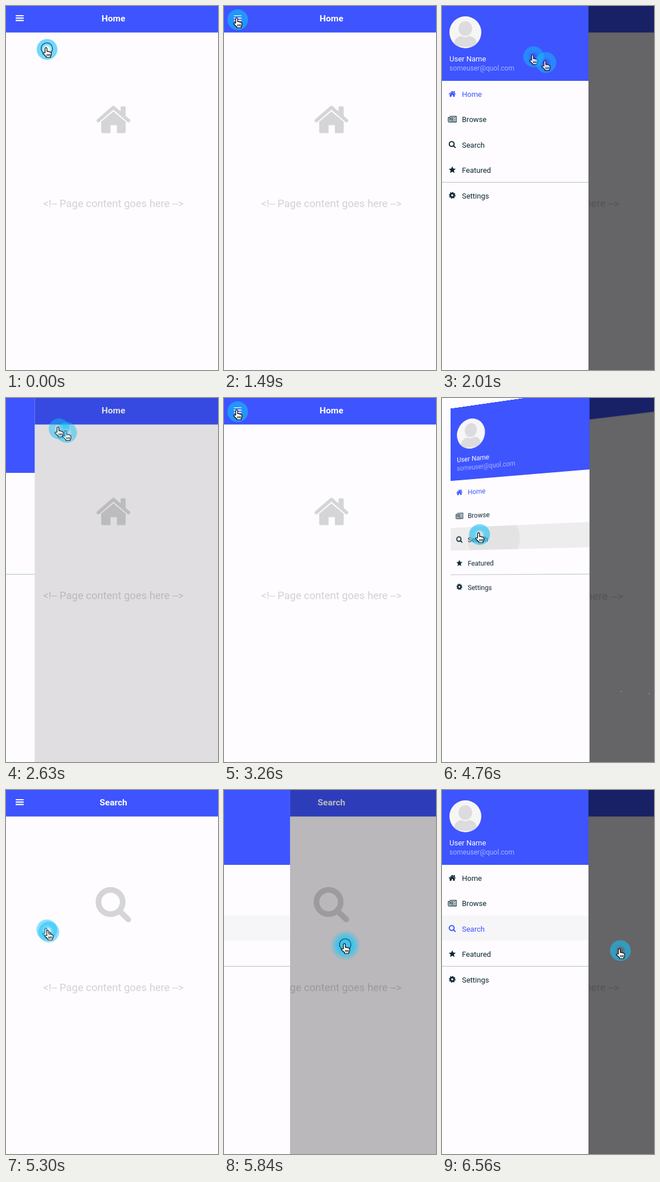
These frames come from a looping animation (372x637 px, 6830 ms). An HTML page:

```html
<!DOCTYPE html>
<html lang="en">
<head>
<meta charset="utf-8">
<title>Side menu</title>
<style>
  html, body { margin: 0; width: 100%; height: 100%; overflow: hidden; background: #fefcff; }
  svg { position: absolute; left: 0; top: 0; width: 372px; height: 637px; overflow: visible; }
  #scene { transform-origin: 186px 318.5px; }
  text { font-family: Roboto, "Open Sans", sans-serif; }
</style>
</head>
<body>
<svg id="scene" viewBox="0 0 372 637">
  <defs>
    <g id="home">
      <path d="M-26.5 2 0-21 26.5 2" fill="none" stroke="currentColor" stroke-width="6" stroke-linecap="round" stroke-linejoin="round"/>
      <path fill="currentColor" d="M12.5-21q0-2 2-2h5q2 0 2 2V-3l-9-8Z"/>
      <path fill="currentColor" d="M-21.5 4 0-14 21.5 4V21.5q0 2.5-2.5 2.5H6V10H-5V24H-19q-2.5 0-2.5-2.5Z"/>
    </g>
    <g id="search" fill="none" stroke="currentColor" stroke-width="10" stroke-linecap="round">
      <circle cx="-5" cy="-5" r="21.3"/>
      <path d="M11 11 26 25.5"/>
    </g>
    <g id="browse" fill="none" stroke="currentColor" stroke-width="1.2">
      <path d="M-4.5-5H7V5H-5.5Q-7 5-7 3.5V-3H-4.5V3.5"/>
      <path d="M-2.5-2.5H1V.8H-2.5ZM2.5-2.6H5.5M2.5 .4H5.5M-2.8 2.9H5.5"/>
    </g>
    <path id="star" fill="currentColor"/>
    <g id="gear" fill="none" stroke="currentColor">
      <circle r="3.3" stroke-width="2.9"/>
      <circle r="5" stroke-width="1.8" pathLength="16" stroke-dasharray="1 1"/>
    </g>
  </defs>
  <g id="page">
    <rect y="-6" width="372" height="660" fill="#fefcff"/>
    <rect y="-6" width="372" height="52.4" fill="#3d54ff"/>
    <path d="M17 17H31M17 21.2H31M17 25.4H31" stroke="#fff" stroke-width="2.2"/>
    <text id="title" x="188.5" y="27" text-anchor="middle" font-size="15.5" font-weight="600" fill="#fff"></text>
    <use id="pageIcon" x="188.5" y="198.5" color="#d5d5d7"/>
    <text x="188.5" y="352" text-anchor="middle" font-size="18.4" fill="#d2d1d4">&lt;!-- Page content goes here --&gt;</text>
  </g>
  <rect id="shade" y="-6" width="372" height="660"/>
  <g id="drawer">
    <rect y="-6" width="257" height="660" fill="#fefcff"/>
    <rect y="-6" width="257" height="137" fill="#3d54ff"/>
    <clipPath id="face"><circle cx="41" cy="46" r="28"/></clipPath>
    <g clip-path="url(#face)">
      <rect x="12" y="17" width="58" height="58" fill="#f6f6f7"/>
      <path d="M21 69C21 54 31 52 41 52S61 54 61 69Q41 74 21 69Z" fill="#dcdcde"/>
      <ellipse cx="41" cy="39.5" rx="13" ry="14" fill="#dcdcde" stroke="#f6f6f7" stroke-width="2"/>
    </g>
    <text x="13" y="97" font-size="13" fill="#fff">User Name</text>
    <text x="13" y="113" font-size="12" fill="#a9b3ff">someuser@quol.com</text>
    <rect id="row" y="220" width="257" height="43"/>
    <clipPath id="rowClip"><rect y="220" width="257" height="43"/></clipPath>
    <g clip-path="url(#rowClip)"><circle id="ripple" cy="243" fill="#e3e3e4"/></g>
    <path d="M0 308.5H257" stroke="#b6c0c6"/>
    <g id="items" font-size="13"></g>
  </g>
</svg>
<svg viewBox="0 0 372 637">
  <defs>
    <radialGradient id="halo">
      <stop offset=".2" stop-color="#13c1f8" stop-opacity=".04"/>
      <stop offset=".5" stop-color="#13c1f8" stop-opacity=".6"/>
      <stop offset=".94" stop-color="#13c1f8" stop-opacity=".6"/>
      <stop offset="1" stop-color="#13c1f8" stop-opacity=".25"/>
    </radialGradient>
    <radialGradient id="glow">
      <stop offset=".5" stop-color="#22c5f5" stop-opacity=".8"/>
      <stop offset="1" stop-color="#22c5f5" stop-opacity="0"/>
    </radialGradient>
    <g id="hand" stroke="#000" stroke-width="1.2" stroke-linejoin="round">
      <path fill="#fff" d="M-3.5 6V-1.5a1.7 1.7 0 0 1 3.4 0V3.5q1.6-.8 3 .5 1.5-.6 2.6.6 2 0 2 2.2V9q0 2-1.5 3.5V14h-7.5v-1.5L-7 7.5q-.4-2 1.6-1.6Z"/>
      <path fill="none" d="M.2 8v3.4M2.6 8v3.4M5 8v3.4"/>
    </g>
  </defs>
  <g id="trail"><circle r="18.5" fill="url(#halo)"/><use href="#hand"/></g>
  <g id="cursor">
    <circle id="haloDot"/>
    <circle id="ring" cx="-.3" cy="-1.5" r="10" fill="none" stroke="#123a55" stroke-width="1.2"/>
    <use href="#hand"/>
  </g>
</svg>
<script>
const LOOP = 6830;
const $ = id => document.getElementById(id);
const set = (id, attrs) => { for (const k in attrs) $(id).setAttribute(k, attrs[k]); };
const ease = (t, start, length) => {
  const p = Math.min(1, Math.max(0, (t - start) / length));
  return (1 - Math.cos(Math.PI * p)) / 2;
};
const within = (t, spans) => spans.some(([a, b]) => t >= a && t < b);

// The picture advances in discrete steps: first, last, count.
const STEPS = [[0, 90, 2], [710, 1310, 8], [1400, 1490, 2], [1750, 2360, 8], [2450, 3080, 8],
  [3170, 3440, 4], [3620, 4240, 8], [4320, 4940, 8], [5030, 5660, 8], [5750, 6110, 5]]
  .flatMap(([a, b, n]) => Array.from({ length: n }, (_, i) => Math.round((a + (b - a) * i / (n - 1)) / 10) * 10));
const snap = t => STEPS.filter(s => s <= t).pop();

// Cursor path: time, x, y
const PATH = [[0, 72, 76], [640, 72, 76], [1300, 24, 24], [1700, 24, 24], [2250, 290, 150], [2320, 290, 150],
  [2630, 93, 54], [3080, 34, 30], [3260, 24, 24], [3450, 24, 24], [3710, 55, 97], [4300, 66, 239],
  [5180, 66, 239], [5480, 92, 266], [5560, 92, 266], [5840, 213, 272], [6080, 313, 281], [LOOP, 313, 281]];
const PRESSES = [[1390, 1480], [2260, 2440], [3340, 3430], [4490, 4680], [5550, 6000]];
const FLIP = { start: 4706, length: 450 };

function slope(i, axis) {
  const a = PATH[i - 1], b = PATH[i], c = PATH[i + 1];
  if (!a || !c || a[axis] === b[axis] || b[axis] === c[axis]) return 0;
  return (c[axis] - a[axis]) / (c[0] - a[0]);
}
function cursorAt(t) {
  const i = Math.max(0, PATH.findIndex(k => k[0] > t) - 1);
  const a = PATH[i], b = PATH[i + 1], d = b[0] - a[0], p = Math.max(0, t - a[0]) / d;
  return [1, 2].map(axis => {
    const h = p * p * (3 - 2 * p);
    return a[axis] * (1 - h) + b[axis] * h
      + d * p * (1 - p) * ((1 - p) * slope(i, axis) - p * slope(i + 1, axis));
  });
}

const ITEMS = [['Home', 'home', .21], ['Browse', 'browse', 1], ['Search', 'search', .2], ['Featured', 'star', 1], ['Settings', 'gear', 1]];
$('items').innerHTML = ITEMS.map(([label, icon, scale], i) => {
  const y = 154 + i * 44.4;
  return `<g id="item${i}"><use href="#${icon}" transform="translate(18 ${y - .3}) scale(${scale})"/>
    <text x="35" y="${y + 5}" fill="currentColor">${label}</text></g>`;
}).join('');
$('star').setAttribute('d', 'M' + Array.from({ length: 10 }, (_, i) => {
  const a = i * Math.PI / 5, r = i % 2 ? 3 : 6.5;
  return [r * Math.sin(a), -r * Math.cos(a)].map(v => v.toFixed(2));
}).join('L') + 'Z');

function drawCursor(t) {
  const now = cursorAt(t), before = cursorAt(Math.max(0, t - 30));
  const pressed = within(t, PRESSES);
  const moving = !pressed && Math.hypot(now[0] - before[0], now[1] - before[1]) > 2;
  set('cursor', { transform: `translate(${now})`, opacity: moving ? .8 : 1 });
  set('trail', { transform: `translate(${before})`, opacity: moving ? .8 : 0 });
  set('haloDot', { r: pressed ? 27 : 18.5, fill: `url(#${pressed ? 'glow' : 'halo'})` });
  set('ring', { opacity: pressed || t < 90 ? 1 : 0 });
}

function draw(t) {
  const turn = 180 * ease(t, FLIP.start, FLIP.length);
  const second = turn > 90;
  const angle = second ? 180 - turn : -turn;
  $('scene').style.transform = angle ? `perspective(250px) rotateY(${angle}deg)` : 'none';

  const open = second ? ease(t, 5690, 320)
    : ease(t, 1701, 250) - ease(t, 2453, 250) + ease(t, 3571, 250);
  set('drawer', { transform: `translate(${257 * (open - 1)})`, visibility: open > 0 ? 'visible' : 'hidden' });
  set('shade', { opacity: .6 * open });

  $('title').textContent = second ? 'Search' : 'Home';
  set('pageIcon', { href: second ? '#search' : '#home', y: second ? 201 : 198.5 });
  ITEMS.forEach((_, i) => set('item' + i, { color: i === (second ? 2 : 0) ? '#3d54ff' : '#0b2833' }));

  const tapped = !second && t > 4590;
  set('row', { fill: tapped ? '#ededee' : '#f6f5f7', opacity: tapped || second ? 1 : 0 });
  const grow = tapped ? (t - 4590) / 170 : 0;
  set('ripple', { cx: 66 + 19 * Math.min(1, grow), r: 50 * grow });
  drawCursor(t);
}

const began = performance.now();
function tick() {
  draw(snap((performance.now() - began) % LOOP));
  requestAnimationFrame(tick);
}
tick();
</script>
</body>
</html>
```
